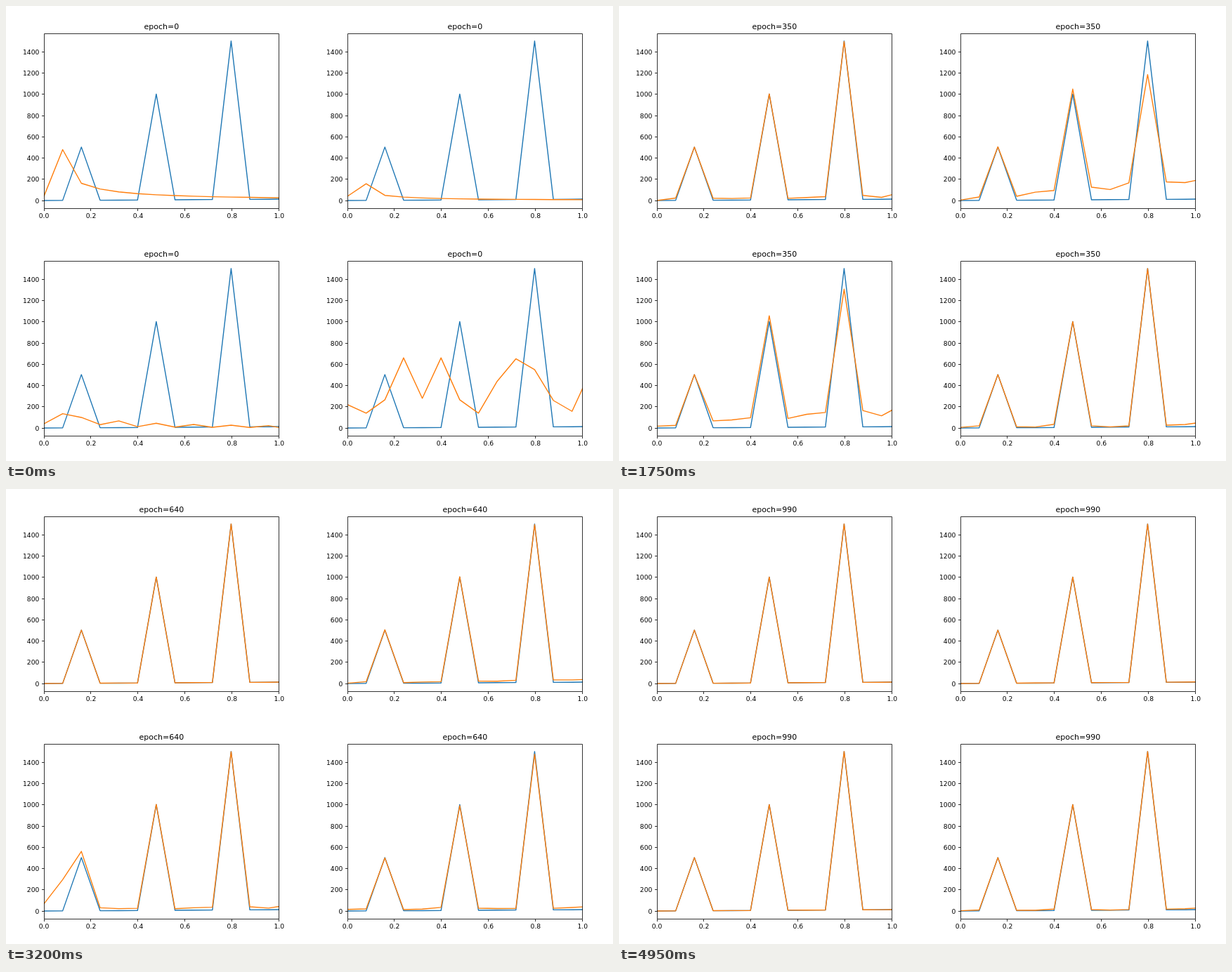
Animation, 864 px wide and 648 px high, one loop 5000 ms. Source, as an HTML page with a canvas:

```html
<!DOCTYPE html>
<html lang="en">
<head>
<meta charset="utf-8">
<title>Training curves</title>
<style>
  html, body { margin: 0; width: 100%; height: 100%; overflow: hidden; background: #fff; }
  canvas { display: block; }
</style>
</head>
<body>
<canvas id="stage" width="864" height="648"></canvas>
<script>
const ctx = document.getElementById('stage').getContext('2d');
const FONT = '"DejaVu Sans", sans-serif';
const BLUE = '#1f77b4', ORANGE = '#ff7f0e';
const LOOP = 5000, STEP = 50, EPOCHS_PER_STEP = 10;
const PLOT = { left: 54, right: 388.8, top: 39.1, bottom: 288.36 };
const BINS = 14, BIN_WIDTH = 1 / (4 * Math.PI);

const bins = Array.from({ length: BINS }, (_, i) => i);
const mix = (a, b, t) => a + (b - a) * t;
const bell = (x, mid, width) => Math.exp(-(((x - mid) / width) ** 2));
const logistic = (x, mid, width) => 1 / (1 + Math.exp((mid - x) / width));
const random = seed => {
  const s = Math.sin(seed * 12.9898) * 43758.5453;
  return s - Math.floor(s);
};

// Three rising peaks, at bins 2, 6 and 10, over a low ramp.
const isPeak = i => i % 4 === 2;
const spectrum = bins.map(i => isPeak(i) ? 125 * (i + 2) + 4 : i);

// Untrained output that falls off as 1/i, optionally alternating.
const falloff = (first, scale, wiggle = 0) => i => {
  if (i < 2) return i ? first : 40;
  const sign = i % 2 ? -1 : 1;
  return scale / i * (1 + sign * wiggle * Math.min(1, (i - 1) / 3));
};

// Untrained output with broad waves and a notch near bin 4.
const waves = i => {
  const wave = 405 + 255 * Math.cos(2 * Math.PI * (i - 4) / 5.2);
  const notch = 380 * Math.cos(2 * Math.PI * (i - 4) / 2.9) * bell(i, 4, 2);
  return (wave - notch) * (i ? 1 : 0.5);
};

// Output after training collapses: a zigzag that tapers off.
const collapsed = i => {
  const zigzag = i % 2 ? -100 : 100;
  return (370 + 110 * Math.sin((i - 4.5) * 0.6) + zigzag) * Math.min(1, (16 - i) / 6);
};

// mids: epoch at which each peak is half learned; width: how gradually.
const panels = [
  { x: 0, y: 0, start: falloff(480, 325), mids: [60, 173, 207], width: 25,
    ghost: 0, drift: 0, driftAt: 0, calm: 640 },
  { x: 432, y: 0, start: falloff(158, 97), mids: [100, 219, 260], width: 68,
    ghost: 700, drift: 95, driftAt: 500, calm: 660 },
  { x: 0, y: 324, start: falloff(135, 165, 0.63), mids: [90, 168, 230], width: 63,
    ghost: 650, drift: 300, driftAt: 620, calm: 980 },
  { x: 432, y: 324, start: waves, mids: Array(3).fill(-Infinity), width: 1,
    ghost: 0, drift: 0, driftAt: 0, calm: 1500, collapseAt: 510 }
];

function trained(p, i, epoch) {
  const gain = rank => logistic(epoch, p.mids[rank], p.width * (rank + 1) / 3);
  const swing = gain(2) * (1 - gain(2));
  let value = spectrum[i] + p.drift * bell(epoch, p.driftAt, 100) * Math.exp(-1.6 * Math.abs(i - 1));
  if (isPeak(i)) {
    const rank = (i - 2) / 4;
    const overshoot = rank === 1 ? 0.6 * swing : 0;
    return value + spectrum[i] * (gain(rank) + overshoot - 1);
  }
  const noise = random(i + p.x + p.y);
  value += 320 * Math.sqrt(swing) * Math.min(1, i / 10) ** 0.8 * (0.7 + 0.5 * noise);
  value += 45 * noise * Math.max(0, 1 - epoch / p.calm);
  // False peaks halfway between the real ones, strongest at bin 8.
  if (i && i % 4 === 0) value += p.ghost * bell(epoch, 180, 70) * bell(i, 8.8, 3.6);
  return value;
}

function estimate(p, epoch) {
  const sinceCollapse = epoch - p.collapseAt;
  const collapse = sinceCollapse >= 0 ? Math.exp(-sinceCollapse / 35) : 0;
  const settled = 1 - Math.exp(-epoch / 40);
  return bins.map(i =>
    mix(mix(p.start(i), trained(p, i, epoch), settled), collapsed(i), collapse));
}

const px = f => mix(PLOT.left, PLOT.right, f);
const py = v => mix(PLOT.bottom, PLOT.top, (v + 75) / 1650);
const snap = v => Math.floor(v) + 0.5;

function curve(values, color) {
  ctx.beginPath();
  values.forEach((v, i) => ctx.lineTo(px(Math.min(i * BIN_WIDTH, 1)), py(v)));
  ctx.strokeStyle = color;
  ctx.lineWidth = 1.4;
  ctx.lineJoin = 'round';
  ctx.lineCap = 'square';
  ctx.stroke();
}

function text(str, x, y, size, align) {
  ctx.font = `${size}px ${FONT}`;
  ctx.textAlign = align;
  ctx.fillText(str, x, y);
}

function axes(epoch) {
  const left = snap(PLOT.left), right = snap(PLOT.right);
  const top = snap(PLOT.top), bottom = snap(PLOT.bottom);
  ctx.strokeStyle = ctx.fillStyle = '#000';
  ctx.lineWidth = 0.8;
  ctx.lineJoin = 'miter';
  ctx.lineCap = 'butt';
  ctx.beginPath();
  ctx.rect(left, top, right - left, bottom - top);
  for (let i = 0; i <= 5; i++) {
    const x = px(i / 5);
    ctx.moveTo(snap(x), bottom);
    ctx.lineTo(snap(x), bottom + 3.5);
    text((i / 5).toFixed(1), x, 302.4, 9.17, 'center');
  }
  for (let v = 0; v <= 1400; v += 200) {
    const y = py(v);
    ctx.moveTo(left, snap(y));
    ctx.lineTo(left - 3.5, snap(y));
    text(v, 47.3, y + 3.5, 9.17, 'right');
  }
  ctx.stroke();
  text(`epoch=${epoch}`, px(0.5), 33, 11, 'center');
}

function drawPanel(panel, epoch) {
  ctx.save();
  ctx.translate(panel.x, panel.y);
  ctx.save();
  ctx.beginPath();
  ctx.rect(54, 39, 335, 250);
  ctx.clip();
  curve(spectrum, BLUE);
  curve(estimate(panel, epoch), ORANGE);
  ctx.restore();
  axes(epoch);
  ctx.restore();
}

const startTime = performance.now();
function draw() {
  const time = Math.max(0, performance.now() - startTime) % LOOP;
  const epoch = Math.floor(time / STEP) * EPOCHS_PER_STEP;
  ctx.fillStyle = '#fff';
  ctx.fillRect(0, 0, 864, 648);
  panels.forEach(panel => drawPanel(panel, epoch));
  requestAnimationFrame(draw);
}
draw();
</script>
</body>
</html>
```
